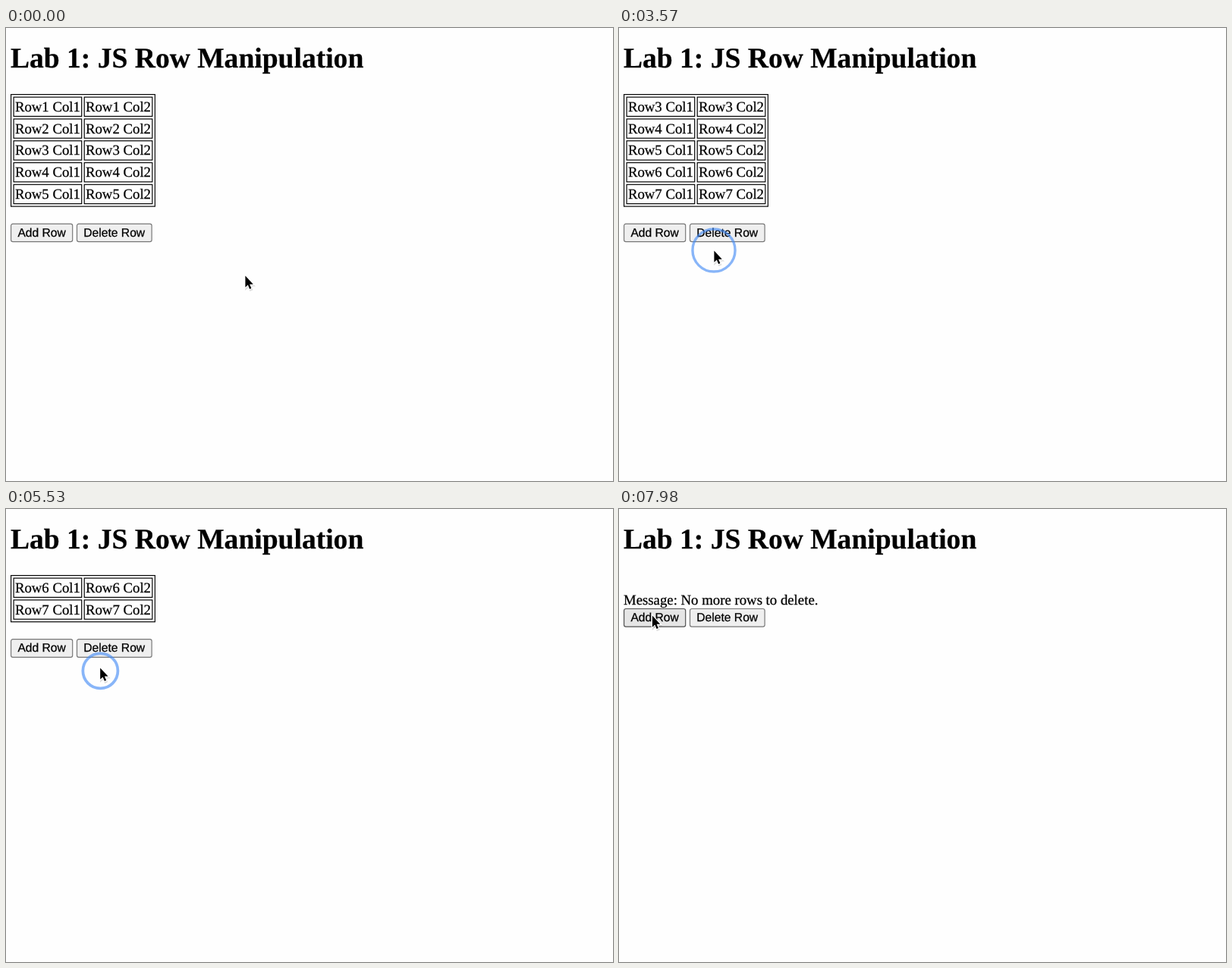
These frames come from a looping animation (800 px wide and 597 px high, 8 s). An HTML page:

```html
<!DOCTYPE html>
<html lang="en">
<head>
<meta charset="utf-8">
<title>Row Manipulation</title>
<style>
  html, body { margin: 0; width: 100%; height: 100%; overflow: hidden; background: #fefefe; }
  svg { display: block; width: 800px; height: 597px; }
  text { font: 18.78px "Liberation Serif", "Times New Roman", serif; font-kerning: none; text-rendering: geometricPrecision; white-space: pre; stroke: #000; stroke-width: 0.25; }
  .title { font-size: 37.56px; font-weight: bold; }
  .button text { font: 15.65px "Liberation Sans", Arial, sans-serif; }
  .box { fill: none; stroke: #000; stroke-width: 1.17; }
  .button rect { stroke-width: 1.17; }
  .ring { fill: none; stroke: rgb(66, 138, 246); }
</style>
</head>
<body>
<svg id="stage" viewBox="0 0 800 597">
  <text class="title" x="6" y="52.4">Lab 1: JS Row Manipulation</text>
</svg>
<script>
const LOOP = 8000, STEP = 70;
const TABLE_LEFT = 6.6, TABLE_TOP = 87.6, ROW_HEIGHT = 28.8, COL_WIDTH = 93.1, GAP = 3.52;
const PRESS = 100, RING_LIFE = 500, RING_RADIUS = 36;

// Pointer moves: start, end, x, y
const moves = [
  [0, 0, 315, 326], [70, 770, 40, 270], [1600, 1920, 58, 298], [2480, 2740, 125, 323],
  [2950, 3200, 125, 293], [3700, 3960, 126, 267], [4250, 4480, 128, 236],
  [5200, 5360, 124, 211], [5500, 5680, 121, 181], [6150, 6370, 121, 149],
  [6740, 7000, 121, 133], [7480, 7900, 43.5, 140]
];
// The first two clicks add a row, the others delete one
const ADDS = 2;
const clicks = [1260, 2035, 2830, 3305, 4080, 4590, 5330, 5735, 6610, 7110];

const stage = document.getElementById("stage");
function add(parent, tag, attrs = {}, content = "") {
  const el = document.createElementNS("http://www.w3.org/2000/svg", tag);
  set(el, attrs);
  el.textContent = content;
  return parent.appendChild(el);
}
function set(el, attrs) {
  for (const name in attrs) el.setAttribute(name, attrs[name]);
}
function show(el, visible) {
  el.style.display = visible ? "" : "none";
}

const frame = add(stage, "rect", { class: "box", x: TABLE_LEFT, y: TABLE_TOP, width: 2 * COL_WIDTH + GAP });
const rows = Array.from({ length: 7 }, (_, i) => {
  const row = add(stage, "g");
  for (const col of [0, 1]) {
    const x = TABLE_LEFT + GAP + col * COL_WIDTH;
    add(row, "rect", { class: "box", x, y: GAP, width: COL_WIDTH - GAP, height: ROW_HEIGHT - GAP });
    add(row, "text", { x: x + 1.76, y: 22.3 }, `Row${i + 1} Col${col + 1}`);
  }
  return row;
});
const message = add(stage, "text", { x: 6, y: 126 }, "Message: No more rows to delete.");

const buttons = [["Add Row", 6.6, 81.1], ["Delete Row", 93.5, 98.6]].map(([label, x, width]) => {
  const group = add(stage, "g", { class: "button" });
  const face = add(group, "rect", { x, y: 0.5, width, height: 23.6, rx: 2.4 });
  add(group, "text", { x: x + 8.8, y: 17.3 }, label);
  return { group, face, x, width };
});

const rings = clicks.map(() => add(stage, "circle", { class: "ring" }));
const pointer = add(stage, "g");
const arrow = "M.4 .6V15.8L3.8 12.6L6.1 18L8.4 17L6.1 11.7H10.8Z";
add(pointer, "path", { d: arrow, opacity: 0.13, transform: "translate(.8 1.8)", stroke: "#000", "stroke-width": 2 });
add(pointer, "path", { d: arrow, stroke: "#fff", "stroke-width": 2.4, "paint-order": "stroke" });

function pointerAt(time) {
  let x = 0, y = 0;
  for (const [start, end, toX, toY] of moves) {
    if (time < start) break;
    const p = end > start ? Math.min(1, (time - start) / (end - start)) : 1;
    const eased = p * p * (3 - 2 * p);
    x += (toX - x) * eased;
    y += (toY - y) * eased;
  }
  return [x, y];
}

function draw(time) {
  const done = clicks.filter(at => time >= at).length;
  const last = 5 + Math.min(done, ADDS);
  const first = Math.min(7, Math.max(0, done - ADDS));
  const count = last - first;
  const warned = done === clicks.length;

  rows.forEach((row, i) => {
    show(row, i >= first && i < last);
    set(row, { transform: `translate(0 ${TABLE_TOP + (i - first) * ROW_HEIGHT})` });
  });
  show(frame, count > 0);
  set(frame, { height: count * ROW_HEIGHT + GAP });
  show(message, warned);

  const [px, py] = pointerAt(time);
  const top = count ? 113.6 + count * ROW_HEIGHT : warned ? 131 : 109.4;
  const pressed = clicks.some(at => time >= at - PRESS && time < at);
  for (const { group, face, x, width } of buttons) {
    const hover = px >= x && px <= x + width && py >= top && py <= top + 24.4;
    set(group, { transform: `translate(0 ${top})` });
    set(face, {
      fill: !hover ? "#efefef" : pressed ? "#f5f5f5" : "#e5e5e5",
      stroke: !hover ? "#767676" : pressed ? "#8d8d8d" : "#4f4f4f"
    });
  }

  rings.forEach((ring, i) => {
    const p = (time - clicks[i]) / RING_LIFE;
    show(ring, p > 0 && p < 1);
    if (p <= 0 || p >= 1) return;
    const [cx, cy] = pointerAt(clicks[i]);
    set(ring, {
      cx, cy,
      r: RING_RADIUS * (1 - (1 - p) ** 2),
      "stroke-width": 4 * (1 - p ** 3),
      opacity: 0.62
    });
  });
  set(pointer, { transform: `translate(${px} ${py})` });
}

const began = performance.now();
function tick() {
  const time = (performance.now() - began) % LOOP;
  draw(Math.floor(time / STEP) * STEP);
  requestAnimationFrame(tick);
}
tick();
</script>
</body>
</html>
```
